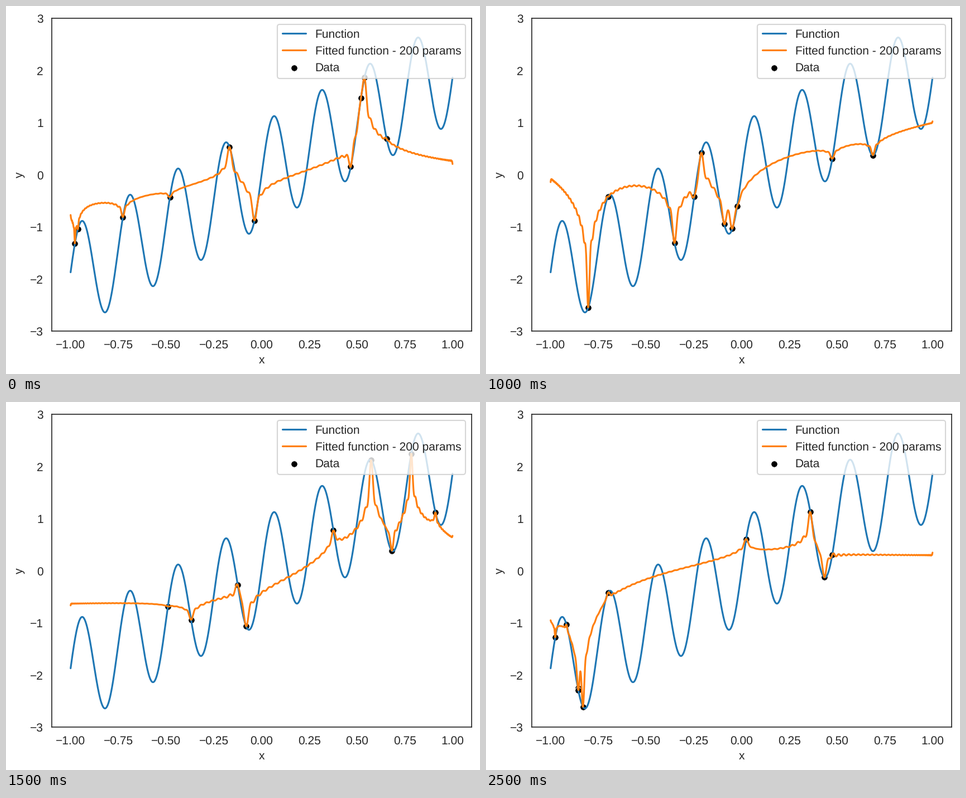
A matplotlib script that plays this animation: 849x660 px, repeating every 3000 ms.

```python
import numpy as np
import matplotlib.pyplot as plt
from matplotlib.animation import FuncAnimation
from numpy.polynomial.legendre import legvander

WIDTH, HEIGHT, DPI = 849, 660, 151.7
LEFT, RIGHT, TOP, BOTTOM = 81.5, 834, 22.5, 583.5
PARAMS = 200
INK = "0.15"

# x of the sampled points in each draw; y and the fit follow from them.
DRAWS = [
    [-.9775, -.962, -.726, -.48, -.168, -.037, .467, .5205, .539, .655],
    [-.9755, -.78, -.569, -.518, -.024, .071, .096, .603, .919, .951],
    [-.803, -.699, -.351, -.248, -.211, -.091, -.048, -.0235, .475, .688],
    [-.4905, -.369, -.125, -.081, .376, .574, .682, .784, .9105],
    [-.923, -.867, -.077, .037, .228, .273, .274, .319, .804],
    [-.9755, -.917, -.857, -.855, -.83, -.699, .024, .36, .433, .475],
]


def func(x):
    return 2 * x + np.sin(25 * x)


def basis(x):
    """Legendre polynomials of degree 1 to PARAMS, without the constant."""
    return legvander(x, PARAMS)[:, 1:]


def fit(x, grid):
    """Minimum-norm interpolation of the samples."""
    return basis(grid) @ np.linalg.lstsq(basis(x), func(x), rcond=None)[0]


plt.rcParams.update({
    "font.family": "Liberation Sans",
    "font.size": 10,
    "text.hinting": "none",
    "text.color": INK,
    "axes.labelcolor": INK,
    "axes.edgecolor": INK,
    "xtick.color": INK,
    "ytick.color": INK,
    "lines.solid_capstyle": "round",
})

# The small margin keeps the pixel size from rounding down.
fig = plt.figure(figsize=((WIDTH + 0.01) / DPI, (HEIGHT + 0.01) / DPI),
                 dpi=DPI, facecolor="white")
ax = fig.add_axes([LEFT / WIDTH, 1 - BOTTOM / HEIGHT,
                   (RIGHT - LEFT) / WIDTH, (BOTTOM - TOP) / HEIGHT])
ax.set(xlim=(-1.1, 1.1), ylim=(-3, 3), xlabel="x", ylabel="y",
       xticks=np.linspace(-1, 1, 9), yticks=range(-3, 4))
ax.tick_params(bottom=False, left=False)

grid = np.linspace(-1, 1, 1000)
ax.plot(grid, func(grid), color="#1f77b4", label="Function")
fitted, = ax.plot(grid, 0 * grid, color="#ff7f0e",
                  label=f"Fitted function - {PARAMS} params")
dots = ax.scatter([0], [0], s=30, color="black", edgecolors="white",
                  linewidths=0.45, label="Data")
ax.legend(loc="upper right")

samples = [np.array(xs) for xs in DRAWS]
fits = [fit(x, grid) for x in samples]


def update(i):
    x = samples[i]
    dots.set_offsets(np.column_stack([x, func(x)]))
    fitted.set_ydata(fits[i])
    return fitted, dots


anim = FuncAnimation(fig, update, frames=len(DRAWS), interval=500, repeat=True)
plt.show()
```
